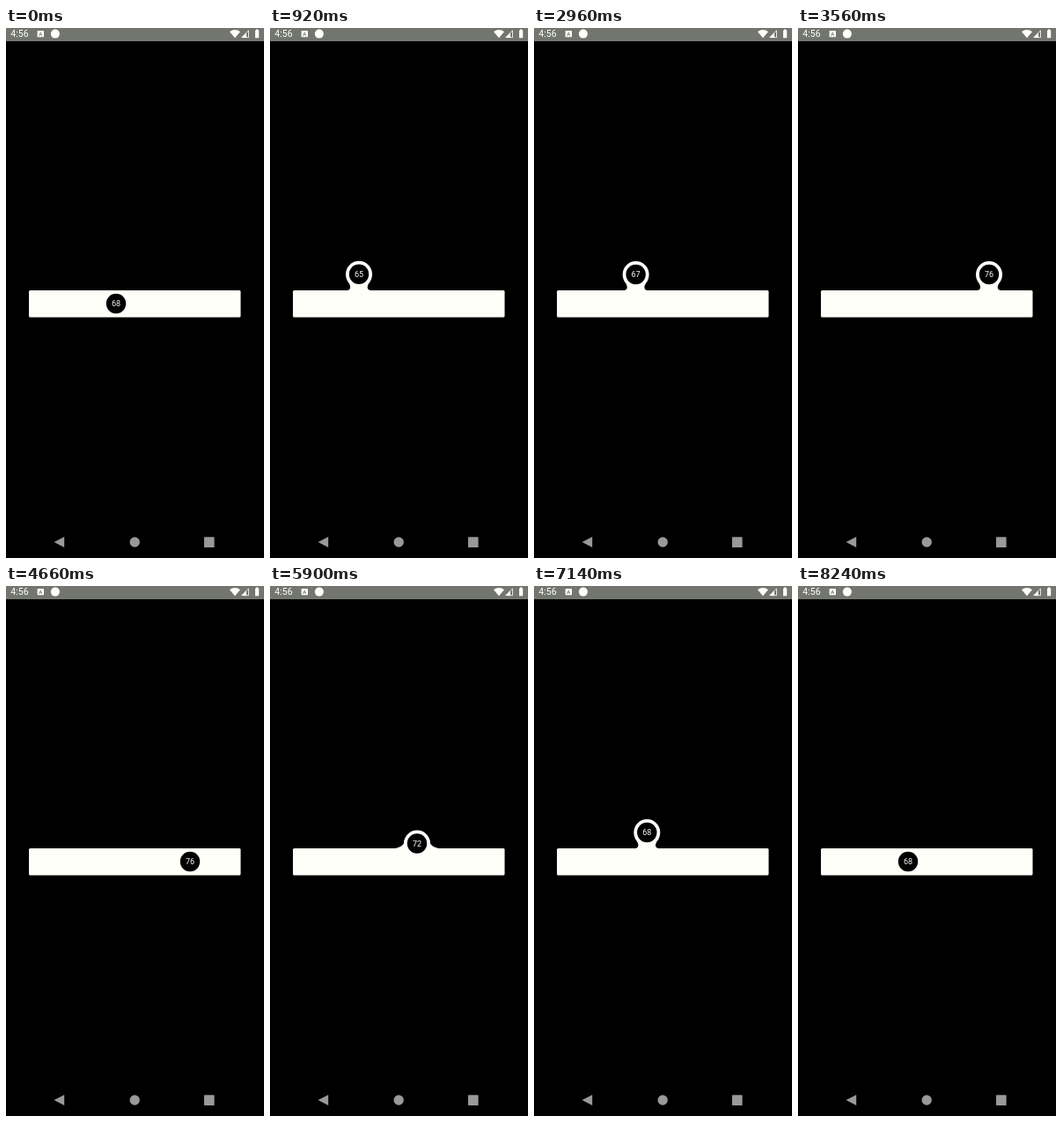
Write an HTML page that moves like this. It is 293x600 px and loops after 8920 ms.

```html
<!DOCTYPE html>
<html lang="en">
<head>
<meta charset="utf-8">
<title>Fluid slider</title>
<style>
  html, body { margin: 0; width: 100%; height: 100%; overflow: hidden; background: #000; }
  svg { display: block; width: 293px; height: 600px; }
  text { font-family: Roboto, "Open Sans", sans-serif; }
</style>
</head>
<body>
<svg viewBox="0 0 293 600">
  <rect width="293" height="600"/>

  <!-- status bar -->
  <rect width="293" height="15" fill="#73766f"/>
  <g fill="#fff">
    <text x="5.3" y="10.4" font-size="10.5">4:56</text>
    <rect x="35.6" y="2.9" width="7.4" height="7.4" rx="0.8"/>
    <text x="39.3" y="8.8" font-size="6" font-weight="700" text-anchor="middle" fill="#73766f">A</text>
    <circle cx="55.9" cy="6.6" r="5"/>
    <path d="M254 4.2Q260 -0.4 266 4.2L260 11.2Z"/>
    <path d="M273 5.6V11H267.6Z"/>
    <path d="M275.5 2.9V10.6H267.8Z" fill="none" stroke="#fff" stroke-width="0.8"/>
    <path d="M283 2.6h1v-1h2.2v1h1v8.6h-4.2Z"/>
  </g>

  <!-- slider -->
  <g fill="#fffffa">
    <rect x="26" y="297" width="240.5" height="30.5" rx="1.5"/>
    <path id="neck"/>
    <circle id="ball" r="15"/>
  </g>
  <circle id="label" r="11.2"/>
  <text id="value" font-size="9" text-anchor="middle" fill="#fff"></text>

  <!-- navigation bar -->
  <g fill="#999">
    <path d="M54.6 582L66.2 576V588Z"/>
    <circle cx="146.2" cy="582" r="5.7"/>
    <rect x="225" y="576.3" width="11.6" height="11.6" rx="0.6"/>
  </g>
</svg>
<script>
const LOOP = 8920;
const BAR_TOP = 297, REST_Y = 312, RISE = 33;
const TOP_R = 15, BOTTOM_R = 375, BOTTOM_Y = BAR_TOP + BOTTOM_R;
const TOP_SPREAD = 0.4, START_SPREAD = 0.25, END_SPREAD = 0.1, HANDLE = 2.4;
const MOVE_MS = 400;

// [time, bubble x]; a 1 ms gap is a snap to a whole value on release
const drag = [
  [0, 125], [620, 125], [1220, 77.3], [1479, 77.3], [1480, 72.5],
  [2500, 72.5], [2960, 115.5], [3240, 168], [3560, 217], [4179, 217], [4180, 209],
  [5080, 209], [5560, 167.2], [5739, 167.2], [5740, 167],
  [6400, 167], [6600, 140.6], [7140, 128.3], [7759, 128.3], [7760, 125], [LOOP, 125]
];
// [start time, whether the bubble goes up]
const lifts = [
  [545, true], [1477, false], [2345, true], [4205, false],
  [4985, true], [5732, false], [6312, true], [7785, false]
];

const el = id => document.getElementById(id);
const neck = el("neck"), ball = el("ball"), label = el("label"), value = el("value");

const overshoot = u => { const t = u - 1; return 1 + t * t * (3 * t + 2); };
const easeInOut = u => (1 - Math.cos(Math.PI * u)) / 2;

const secant = i => (drag[i + 1][1] - drag[i][1]) / (drag[i + 1][0] - drag[i][0]);

function slope(i) {
  if (i === 0 || i === drag.length - 1) return 0;
  const a = secant(i - 1), b = secant(i);
  return a * b > 0 ? 2 * a * b / (a + b) : 0;
}

// monotone cubic through the drag points
function bubbleX(t) {
  let i = 0;
  while (i < drag.length - 2 && t >= drag[i + 1][0]) i++;
  const [t0, x0] = drag[i], [t1, x1] = drag[i + 1];
  const h = t1 - t0, u = (t - t0) / h, v = 1 - u;
  return x0 * v * v * (1 + 2 * u) + x1 * u * u * (3 - 2 * u)
    + h * u * v * (v * slope(i) - u * slope(i + 1));
}

function bubbleY(t) {
  const last = lifts.filter(l => l[0] <= t).pop();
  if (!last) return REST_Y;
  const u = Math.min(1, (t - last[0]) / MOVE_MS);
  return REST_Y - RISE * (last[1] ? overshoot(u) : 1 - easeInOut(u));
}

const polar = (angle, r) => [Math.cos(angle) * r, Math.sin(angle) * r];
const add = (p, q) => [p[0] + q[0], p[1] + q[1]];
const pair = p => p[0].toFixed(3) + " " + p[1].toFixed(3);

// metaball bridge between the bubble and a huge circle touching the bar top
function neckPath(x, y) {
  const d = BOTTOM_Y - y;
  if (d <= BOTTOM_R - TOP_R + 0.01) return "";
  const rise = Math.min(1, Math.max(0, BAR_TOP - (y - TOP_R)) / RISE);
  const spread = START_SPREAD - (START_SPREAD - END_SPREAD) * rise;
  const meet = (a, b) => d < a + b ? Math.acos((a * a + d * d - b * b) / (2 * a * d)) : 0;
  const u1 = meet(BOTTOM_R, TOP_R), u2 = meet(TOP_R, BOTTOM_R);
  const tangent = Math.acos((BOTTOM_R - TOP_R) / d);
  const low = u1 + (tangent - u1) * spread;
  const high = Math.PI - u2 - (Math.PI - u2 - tangent) * TOP_SPREAD;

  const side = s => {
    const a1 = -Math.PI / 2 + s * low, a2 = -Math.PI / 2 + s * high;
    const base = add([x, BOTTOM_Y], polar(a1, BOTTOM_R));
    const top = add([x, y], polar(a2, TOP_R));
    const gap = Math.hypot(base[0] - top[0], base[1] - top[1]);
    const reach = Math.min(Math.max(TOP_SPREAD, spread) * HANDLE, gap / (BOTTOM_R + TOP_R))
      * Math.min(1, 2 * d / (BOTTOM_R + TOP_R));
    const foot = [base[0], base[1] - Math.abs(BAR_TOP - base[1]) * rise + 0.3];
    return {
      foot, top,
      footHandle: add(foot, polar(a1 - s * Math.PI / 2, BOTTOM_R * reach)),
      topHandle: add(top, polar(a2 + s * Math.PI / 2, TOP_R * reach))
    };
  };
  const a = side(1), b = side(-1), down = [0, 1.5];
  return `M${pair(add(a.foot, down))}L${pair(a.foot)}`
    + `C${pair(a.footHandle)} ${pair(a.topHandle)} ${pair(a.top)}`
    + `L${pair([x, y])}L${pair(b.top)}`
    + `C${pair(b.topHandle)} ${pair(b.footHandle)} ${pair(b.foot)}`
    + `L${pair(add(b.foot, down))}Z`;
}

function draw(t) {
  const x = bubbleX(t), y = bubbleY(t);
  neck.setAttribute("d", neckPath(x, y));
  for (const c of [ball, label]) {
    c.setAttribute("cx", x);
    c.setAttribute("cy", y);
  }
  value.setAttribute("x", x);
  value.setAttribute("y", y + 3.2);
  value.textContent = 60 + Math.floor((x - 41) / 10.5 + 1e-6);
}

const start = performance.now();
function tick() {
  draw((performance.now() - start) % LOOP);
  requestAnimationFrame(tick);
}
tick();
</script>
</body>
</html>
```
